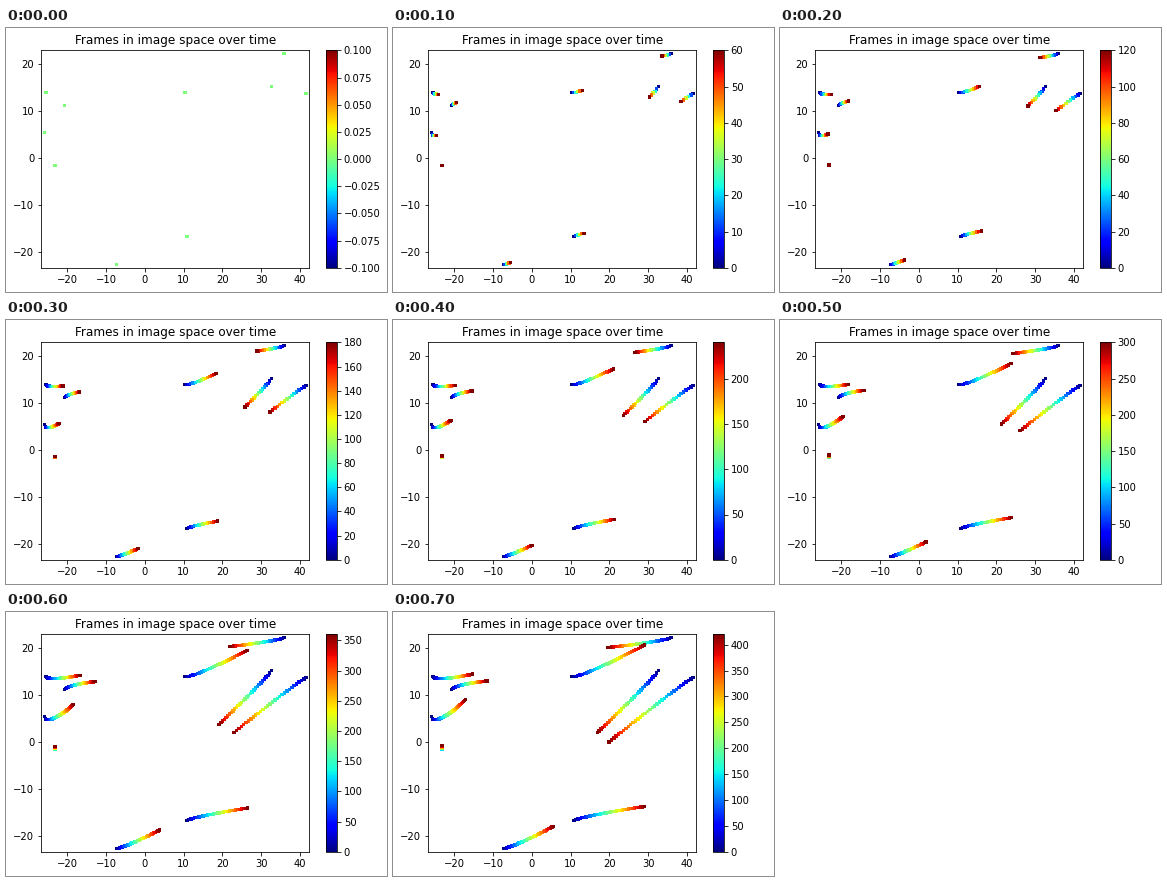
Recreate the animation shown at these times as a matplotlib script. Size 381 px wide and 264 px high, loop 0.8 s.

```python
import matplotlib.pyplot as plt
import numpy as np
from matplotlib.animation import FuncAnimation

WIDTH, HEIGHT, DPI = 381, 264, 72
FRAMES, INTERVAL = 8, 100
TIME_PER_FRAME, TIME_STEP = 60, 12
END_TIME = (FRAMES - 1) * TIME_PER_FRAME

# Each track: start x, start y, travel x, travel y, vertical bend.
TRACKS = np.array([
    (-25.45, 13.9, 10.2, 0.55, -1.4),
    (-20.65, 11.15, 9.1, 1.8, 1.1),
    (-25.85, 5.4, 8.8, 3.6, -3.6),
    (-23.1, -1.6, 0, 0.85, -0.4),
    (-7.3, -22.65, 12.9, 4.65, -1),
    (10.9, -16.7, 18.2, 2.95, 0.7),
    (10.35, 13.95, 18.7, 6.7, -1.6),
    (35.85, 22.25, -16.2, -2.15, -0.8),
    (32.6, 15.15, -15.7, -13.15, -0.9),
    (41.6, 13.7, -21.7, -13.7, 0.7),
])


def positions(time):
    """Steady travel with a sideways bend that is strongest early on."""
    t = time / END_TIME
    x, y, dx, dy, bend = TRACKS.T
    return np.column_stack([x + dx * t, y + dy * t + bend * np.sqrt(t) * (1 - t)])


fig = plt.figure(figsize=(WIDTH / DPI, HEIGHT / DPI), dpi=DPI)


def pixel_axes(left, width, bottom=24.2, height=217.44):
    return fig.add_axes([left / WIDTH, bottom / HEIGHT, width / WIDTH, height / HEIGHT])


ax = pixel_axes(35.3, 267.84)
ax.set(xlim=(-26.65, 42.35), ylim=(-23.4, 22.9))
ax.set_title("Frames in image space over time")

points = ax.scatter([0], [0], c=[0], s=12, marker="s", linewidths=0,
                    cmap="jet", vmin=-0.1, vmax=0.1)
fig.colorbar(points, cax=pixel_axes(319.88, 10.87))


def update(frame):
    now = frame * TIME_PER_FRAME
    times = np.arange(0, now + 1, TIME_STEP)
    points.set_offsets(np.vstack([positions(time) for time in times]))
    points.set_array(np.repeat(times, len(TRACKS)))
    points.set_clim(*((0, now) if now else (-0.1, 0.1)))
    return [points]


animation = FuncAnimation(fig, update, frames=FRAMES, interval=INTERVAL,
                          repeat=True, blit=False)
plt.show()
```
